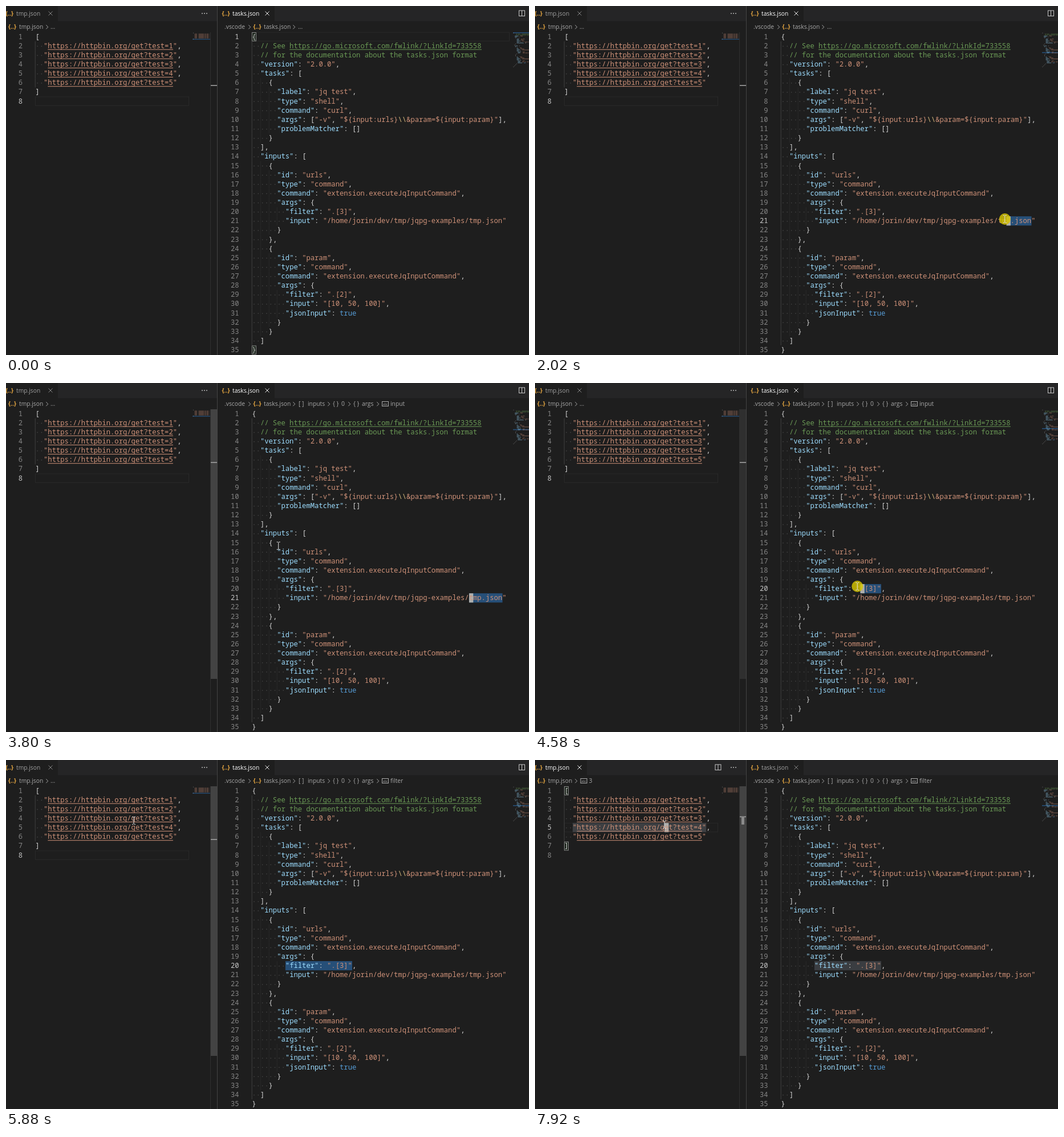
Animation, 917 px wide and 611 px high, one loop 8 s. Source, as an HTML page:

```html
<!DOCTYPE html>
<html lang="en">
<head>
<meta charset="utf-8">
<title>Editor</title>
<style>
html, body { margin: 0; width: 100%; height: 100%; overflow: hidden; background: #1e1e1e; }
svg { display: block; width: 917px; height: 611px; }
text { white-space: pre; }
.code { font: 12.2px "Noto Sans Mono", "DejaVu Sans Mono", monospace; font-variant-ligatures: none; }
.ui { font: 10.3px "Open Sans", "Noto Sans", sans-serif; }
.icon { font-weight: 700; }
</style>
</head>
<body>
<svg id="stage" viewBox="0 0 917 611"></svg>
<script>
const LOOP = 8000, CH = 7.32, ROW = 16.13, TOP = 45.6;
const LEFT = 51.4, RIGHT = 431.3;
const ORANGE = '#ce9178', GREY = '#a9a9a9';
const stage = document.getElementById('stage');

const leftCode = ['[', ...[1, 2, 3, 4, 5].map(n =>
  `  "https://httpbin.org/get?test=${n}"${n < 5 ? ',' : ''}`), ']', ''];
const rightCode = String.raw`{
  // See https://go.microsoft.com/fwlink/?LinkId=733558
  // for the documentation about the tasks.json format
  "version": "2.0.0",
  "tasks": [
    {
      "label": "jq test",
      "type": "shell",
      "command": "curl",
      "args": ["-v", "${'$'}{input:urls}\\&param=${'$'}{input:param}"],
      "problemMatcher": []
    }
  ],
  "inputs": [
    {
      "id": "urls",
      "type": "command",
      "command": "extension.executeJqInputCommand",
      "args": {
        "filter": ".[3]",
        "input": "/home/jorin/dev/tmp/jqpg-examples/tmp.json"
      }
    },
    {
      "id": "param",
      "type": "command",
      "command": "extension.executeJqInputCommand",
      "args": {
        "filter": ".[2]",
        "input": "[10, 50, 100]",
        "jsonInput": true
      }
    }
  ]
}`.split('\n');

function add(tag, attrs, parent = stage, content) {
  const el = document.createElementNS('http://www.w3.org/2000/svg', tag);
  for (const k in attrs) el.setAttribute(k, attrs[k]);
  if (content !== undefined) el.textContent = content;
  parent.appendChild(el);
  return el;
}
const group = (parent = stage) => add('g', {}, parent);
const rect = (x, y, w, h, fill, parent, more) =>
  add('rect', { x, y, width: w, height: h, fill, ...more }, parent);
const outline = (x, y, w, h, stroke, parent) =>
  rect(x, y, w, h, 'none', parent, { stroke });
const path = (d, stroke, parent, width = 1) =>
  add('path', { d, stroke, fill: 'none', 'stroke-width': width }, parent);
const label = (x, y, s, fill = GREY, parent, cls = 'ui') =>
  add('text', { x, y, fill, class: cls }, parent, s);
const rowTop = n => TOP + (n - 1) * ROW;
const show = (el, on) => el.setAttribute('visibility', on ? 'visible' : 'hidden');
const set = (el, attrs) => { for (const k in attrs) el.setAttribute(k, attrs[k]); };

// Splits a line into [column, text, colour] pieces.
function tokens(line) {
  const out = [];
  const comment = line.trim().startsWith('//');
  const re = comment ? /\S.*/g : /"(?:\\.|[^"])*"(?=:)|"(?:\\.|[^"])*"|true|[^\s"]+/g;
  for (const m of line.matchAll(re)) {
    const s = m[0];
    if (comment) out.push([m.index, s, '#6a9955']);
    else if (s === 'true') out.push([m.index, s, '#569cd6']);
    else if (s[0] !== '"') out.push([m.index, s, '#d4d4d4']);
    else if (line[m.index + s.length] === ':') out.push([m.index, s, '#9cdcfe']);
    else for (const p of s.matchAll(/\\\\|[^\\]+/g))
      out.push([m.index + p.index, p[0], p[0][0] === '\\' ? '#d7ba7d' : ORANGE]);
  }
  return out;
}

function drawCode(lines, x0, numRight, parent) {
  return lines.map((line, i) => {
    const y = rowTop(i + 1), base = y + 12.1;
    const indent = line.length - line.trimStart().length;
    for (let c = 0; c < indent; c++) {
      rect(x0 + c * CH + 3, y + 8, 1.4, 1.4, '#474747', parent);
      if (c % 2 === 0)
        rect(Math.round(x0 + c * CH) - .3, y, 1, ROW, c ? '#2a2a2a' : '#404040', parent);
    }
    for (const [c, s, fill] of tokens(line)) label(x0 + c * CH, base, s, fill, parent, 'code');
    const url = /https:[^"\s]+/.exec(line);
    if (url) rect(x0 + url.index * CH, base + 1.9, url[0].length * CH, 1,
      line.includes('//  ') || line.includes('// See') ? '#6a9955' : ORANGE, parent);
    const num = label(numRight, base, i + 1, '#858585', parent, 'code');
    num.setAttribute('text-anchor', 'end');
    return num;
  });
}

function drawMinimap(lines, x0, right) {
  lines.forEach((line, i) => {
    for (const [c, s, fill] of tokens(line))
      for (const w of s.matchAll(/[\w.]+|[{}[\]]/g)) {
        const x = x0 + (c + w.index) * .87;
        if (x < right) rect(x, 46.8 + i * 1.74, Math.min(w[0].length * .87, right - x), 1.1,
          fill, stage, { opacity: .45 });
      }
  });
}

const chevron = (x, parent) => path(`M${x - 1.7} 33.3l3.4 3.5l-3.4 3.5`, GREY, parent);
const jsonIcon = (x, y) => label(x, y, '{..}', '#e2a440', stage, 'ui icon');
function abcIcon(x, parent) {
  outline(x + .5, 32.5, 11, 8, GREY, parent);
  add('text', { x: x + 1.8, y: 38.6, fill: GREY, 'font-size': 5.2, 'font-family': 'Open Sans, sans-serif' }, parent, 'abc');
}
function cross(x) { return path(`M${x - 3.5} 9.5l7 7m0 -7l-7 7`, '#fff', stage); }
function splitIcon(x) {
  const g = group();
  outline(x - 5, 8, 10, 9.5, '#c5c5c5', g);
  path(`M${x} 8v9.5`, '#c5c5c5', g);
  return g;
}

// Tab bars and titles
rect(91, 0, 279, 26.5, '#252526');
rect(471, 0, 446, 26.5, '#252526');
jsonIcon(-1, 16.5);
jsonIcon(378.5, 16.5);
const leftTitle = label(18, 16.7, 'tmp.json');
const rightTitle = label(397, 16.7, 'tasks.json');
const leftCross = cross(78), rightCross = cross(458);
const leftSplit = splitIcon(321), rightSplit = splitIcon(904.5);
for (const x of [344, 348, 352]) add('circle', { cx: x, cy: 13, r: .9, fill: '#c5c5c5' });

// Breadcrumbs
jsonIcon(4, 40.4);
label(23, 40.4, 'tmp.json');
chevron(72);
const leftDots = label(78, 40.4, '...');
const leftItem = group();
abcIcon(79.5, leftItem);
label(94.5, 40.4, '3', GREY, leftItem);
label(383, 40.4, '.vscode');
chevron(427);
jsonIcon(433.5, 40.4);
label(452, 40.4, 'tasks.json');
chevron(505);
const rightDots = label(512, 40.4, '...');
const crumbs = group();
[[513, '[ ]'], [529, 'inputs'], [573, '{ }'], [588, '0'], [609, '{ }'], [624, 'args']]
  .forEach(([x, s]) => label(x, 40.4, s, GREY, crumbs));
[566, 602, 652].forEach(x => chevron(x, crumbs));
abcIcon(659, crumbs);
const lastCrumb = label(674, 40.4, 'input', GREY, crumbs);

// Layers below the text
const leftLine = outline(51.5, 0, 269, 15.2, '#292929');
const rightLine = outline(431.5, TOP + .5, 451, 15.2, '#292929');
const wordMark = rect(LEFT + 2 * CH, rowTop(5), 32 * CH, ROW, '#3d3f42');
const selection = rect(0, 0, 0, ROW, '#264f78');
const rightBlock = rect(0, 0, CH, ROW, '#aeafad');
const leftBlock = rect(LEFT + 24 * CH, rowTop(5), CH, ROW, '#aeafad');
function brackets(x, rows) {
  const g = group();
  rows.forEach(n => rect(x + .1, rowTop(n) + .9, 7, 14.8, '#1c251c', g, { stroke: '#888' }));
  return g;
}
const leftBrackets = brackets(LEFT, [1, 7]);
const rightBrackets = brackets(RIGHT, [1, 35]);

const leftNums = drawCode(leftCode, LEFT, 29, stage);
const rightNums = drawCode(rightCode, RIGHT, 408.5, stage);

// Minimaps, scrollbar and separators
const leftMapLine = rect(327, 57.6, 31, 1.3, '#264f78');
const rightMapLine = rect(889, 0, 28, 1.6, '#264f78');
drawMinimap(leftCode, 328, 356.5);
drawMinimap(rightCode, 889.5, 917);
rect(358, 46, 1, 565, '#303030');
const slider = rect(359, 46, 11, 472, '#434343');
const rulerMark = rect(359, 0, 11, 1.6, '#a0a0a0');
const rulerWord = rect(362, 99, 5, 14, '#8a8a8a');
rect(370, 0, 1, 611, '#444');

// Link hint
const hint = group();
rect(73.5, 71.5, 152, 22, '#252526', hint, { stroke: '#454545' });
label(81, 86.2, 'Follow link (ctrl + click)', '#ccc', hint);

// Pointer
const pointer = group();
const halo = add('circle', { r: 10, fill: '#d6c400', opacity: .82 }, pointer);
path('M-3 -6.5h2l1 1l1 -1h2M0 -5.5v11M-3 6.5h2l1 -1l1 1h2', '#e4e4e4', pointer);

const moves = [[710, 800, 330], [1050, 850, 452], [1490, 870, 374], [1620, 870, 374],
  [2020, 822, 373], [2400, 811.5, 374], [2580, 811.5, 374], [2900, 400, 210], [3180, 134, 100],
  [3350, 176, 125], [3420, 190, 135], [3800, 476, 284], [4190, 606, 358], [4270, 606, 358],
  [5040, 504, 353], [5270, 488.5, 353], [5420, 485, 350], [5880, 224, 106],
  [6690, 224, 106], [6790, 227, 113]];
const starts = [0, 710, 1620, 2580, 3420, 4270, 5120, 5420, 6200, 6690, 7600];
const clamp = (v, a, b) => Math.min(b, Math.max(a, v));
const ramp = (t, a, b) => clamp((t - a) / (b - a), 0, 1);
const within = (t, a, b) => t >= a && t < b;
const blink = (t, from) => t < from || Math.floor((t - from) / 500) % 2 === 0;

function held(t) {
  const s = starts.filter(v => v <= t).pop();
  return s + Math.floor((t - s + 8) / 77) * 77;
}

function pointerAt(t) {
  const i = moves.findIndex(m => m[0] > t);
  if (i < 0) return moves[moves.length - 1].slice(1);
  if (i === 0) return moves[0].slice(1);
  const [t0, x0, y0] = moves[i - 1], [t1, x1, y1] = moves[i];
  const k = (t - t0) / (t1 - t0);
  return [x0 + (x1 - x0) * k, y0 + (y1 - y0) * k];
}

function render(t) {
  const [mx, my] = pointerAt(held(t));
  const leftFocus = t >= 6770;
  const leftRow = leftFocus ? 5 : 8;
  const rightRow = t < 1620 ? 1 : t < 4270 ? 21 : 20;

  show(pointer, t >= 710);
  set(pointer, { transform: `translate(${mx.toFixed(1)} ${my.toFixed(1)})` });
  show(halo, t >= 710 && (within(t, 1620, 2400) || within(t, 4270, 5270) || within(t, 6770, 6930)));

  // Text selection follows the pointer while dragging
  const first = t < 4270;
  const [lo, hi, dropped] = first ? [52, 60, 2400] : [8, 24, 5270];
  const col = t < dropped ? clamp(Math.ceil((mx - RIGHT) / CH), lo, hi) : lo;
  const x = RIGHT + col * CH, y = rowTop(rightRow);
  show(selection, t >= 1620);
  set(selection, { x, y, width: (hi - col) * CH, fill: leftFocus ? '#3a3d41' : '#264f78' });
  show(rightBlock, t >= 1620 && !leftFocus && blink(t, dropped));
  set(rightBlock, { x, y });
  show(leftBlock, leftFocus && blink(t, 6790));

  leftNums.forEach((n, i) => set(n, { fill: i + 1 === leftRow ? '#c6c6c6' : '#858585' }));
  rightNums.forEach((n, i) => set(n, { fill: i + 1 === rightRow ? '#c6c6c6' : '#858585' }));
  set(leftLine, { y: rowTop(leftRow) + .5 });
  show(rightLine, t < 1620);
  show(rightBrackets, t < 1620);
  show(leftBrackets, t >= 7600);
  show(wordMark, t >= 7920);
  show(rulerWord, t >= 7920);
  set(rulerMark, { y: leftFocus ? 98.6 : 138.4 });
  show(leftMapLine, !leftFocus);
  set(rightMapLine, { y: 46 + (rightRow - 1) * 1.74 });

  // Focused group
  set(leftTitle, { fill: leftFocus ? '#fff' : '#a0a0a0' });
  set(rightTitle, { fill: leftFocus ? '#a0a0a0' : '#fff' });
  set(leftCross, { opacity: leftFocus ? .9 : .45 });
  set(rightCross, { opacity: leftFocus ? .45 : .9 });
  show(leftSplit, leftFocus);
  show(rightSplit, !leftFocus);

  // Breadcrumbs
  show(rightDots, t < 2340);
  show(crumbs, t >= 2340);
  lastCrumb.textContent = t < 5570 ? 'input' : 'filter';
  show(leftDots, t < 7250);
  show(leftItem, t >= 7250);

  const bar = t < 4150 ? ramp(t, 2900, 3000) : t < 5500 ? 1 - ramp(t, 4150, 4950) : ramp(t, 5610, 5720);
  set(slider, { opacity: bar });
  set(hint, { opacity: t < 6690 ? ramp(t, 6190, 6300) : 0 });
}

const begin = performance.now();
function tick(now) {
  render(Math.max(0, now - begin) % LOOP);
  requestAnimationFrame(tick);
}
render(0);
requestAnimationFrame(tick);
</script>
</body>
</html>
```
